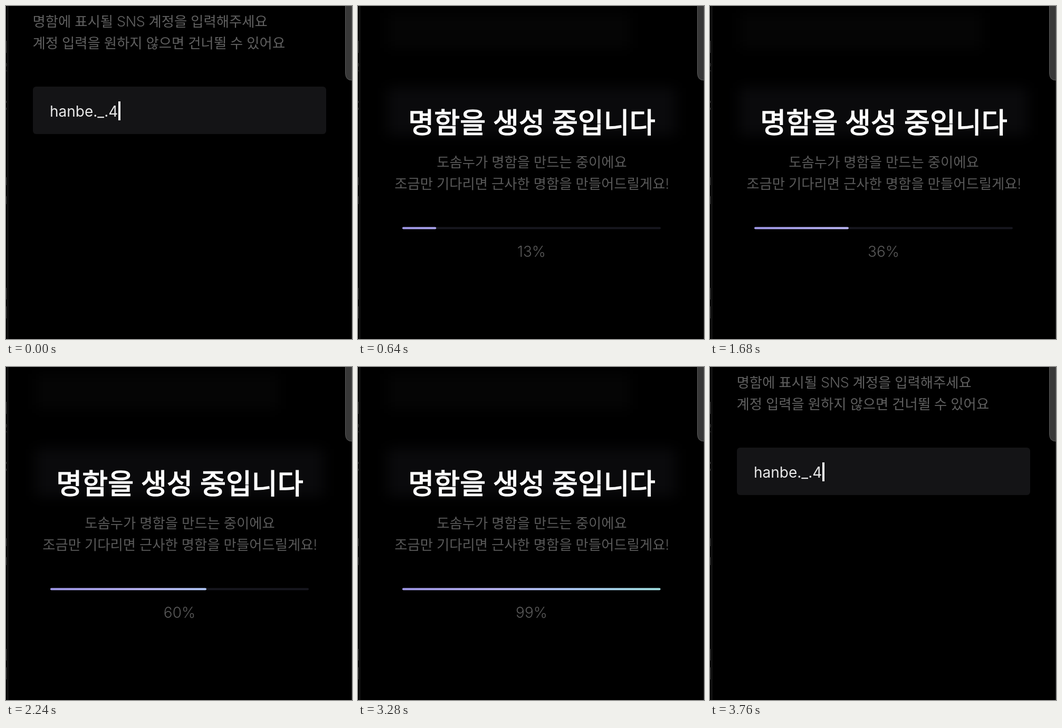
Recreate the animation shown at these times as an HTML page. Size 656x632 px, loop 3.84 s.

```html
<!DOCTYPE html>
<html lang="ko">
<head>
<meta charset="utf-8">
<title>명함 생성</title>
<style>
  html, body { margin: 0; width: 100%; height: 100%; overflow: hidden; background: #000; }
  svg { display: block; width: 656px; height: 632px; }
  text { font-family: Inter, "Noto Sans CJK KR", sans-serif; font-size: 28px; font-weight: 300; }
  .ko { font-family: "Noto Sans CJK KR", sans-serif; font-size: 26.4px; word-spacing: -.45px; }
  .latin { font-family: Inter, sans-serif; font-size: 27px; letter-spacing: -.4px; }
  .form { fill: #606060; }
  .mid { text-anchor: middle; fill: #595959; }
  .title { font-size: 53.2px; font-weight: 400; word-spacing: -.9px; fill: #fff; stroke: #fff; stroke-width: 1.6px; }
  .account { font-size: 28px; font-weight: 400; fill: #e8e8e8; }
</style>
</head>
<body>
<svg viewBox="0 0 656 632">
  <defs>
    <linearGradient id="tint" gradientUnits="userSpaceOnUse" x1="84" y1="0" x2="574" y2="0">
      <stop offset="0" stop-color="#a199ea"/>
      <stop offset=".36" stop-color="#bcb7f6"/>
      <stop offset=".65" stop-color="#b1cdfa"/>
      <stop offset="1" stop-color="#a2e2e2"/>
    </linearGradient>
    <filter id="soft" x="-20%" y="-60%" width="140%" height="220%" color-interpolation-filters="sRGB">
      <feGaussianBlur stdDeviation="12"/>
    </filter>
  </defs>
  <rect width="656" height="632"/>

  <g id="form">
    <text class="ko form" x="50.5" y="39">명함에 표시될 <tspan class="latin">SNS</tspan> 계정을 입력해주세요</text>
    <text class="ko form" x="50.5" y="80">계정 입력을 원하지 않으면 건너뛸 수 있어요</text>
    <rect x="51" y="153" width="556" height="90" rx="6" fill="#141416"/>
    <text class="account" x="83" y="210">hanbe._.4</text>
    <rect x="213" y="181" width="4" height="36" fill="#fff"/>
  </g>

  <g id="loading">
    <g filter="url(#soft)">
      <rect x="56" y="14" width="460" height="66" fill="#050505"/>
      <rect x="56" y="155" width="546" height="90" fill="#0a0a0c"/>
    </g>
    <text class="ko mid title" x="329.5" y="240.5">명함을 생성 중입니다</text>
    <text class="ko mid" x="329.5" y="306">도솜누가 명함을 만드는 중이에요</text>
    <text class="ko mid" x="329.5" y="347">조금만 기다리면 근사한 명함을 만들어드릴게요<tspan class="latin">!</tspan></text>
    <rect x="84" y="419.5" width="490" height="4" rx="2" fill="#17171f"/>
    <rect id="bar" x="84" y="419.5" width="0" height="4" rx="2" fill="url(#tint)"/>
    <text id="count" class="mid" x="329" y="476">0%</text>
  </g>

  <!-- device edges -->
  <path d="M3.5 0V632" stroke="#303030"/>
  <path d="M655.5 140V632" stroke="#262626"/>
  <path d="M.5 66V89M.5 325V340M.5 361V376M.5 535V557M.5 570V593" stroke="#4a4a4a"/>
  <path d="M0 108q2 3 0 7M0 122l1.5 2M.5 180v4M.5 193v4" fill="none" stroke="#4a4a4a"/>
  <path d="M643.5 -2V127Q643.5 141 656 141V-2Z" fill="#383838" stroke="#5a5a5a"/>
</svg>
<script>
  const LOOP = 3840, STEP = 80, BAR = 490;
  // [start ms, end ms, from %, to %]
  const moves = [
    [400, 720, 0, 15],
    [1120, 1440, 15, 36.5],
    [1840, 2160, 36.5, 60.4],
    [2560, 3080, 60.4, 99.9]
  ];
  const $ = id => document.getElementById(id);
  const form = $('form'), loading = $('loading'), bar = $('bar'), count = $('count');

  const clamp = x => Math.min(1, Math.max(0, x));
  const easeInOut = x => x < .5 ? 2 * x * x : 1 - 2 * (1 - x) ** 2;

  function progress(t) {
    return moves.reduce((sum, [a, b, from, to]) =>
      sum + (to - from) * easeInOut(clamp((t - a) / (b - a))), 0);
  }

  function draw(t) {
    const shown = clamp(t / 160) - clamp((t - 3280) / 160);
    const value = progress(t);
    form.setAttribute('opacity', 1 - shown);
    loading.setAttribute('opacity', shown);
    bar.setAttribute('width', BAR * value / 100);
    count.textContent = Math.floor(value + 1e-6) + '%';
  }

  function tick() {
    const t = performance.now() % LOOP;
    draw(Math.floor(t / STEP) * STEP);
    requestAnimationFrame(tick);
  }
  tick();
</script>
</body>
</html>
```
